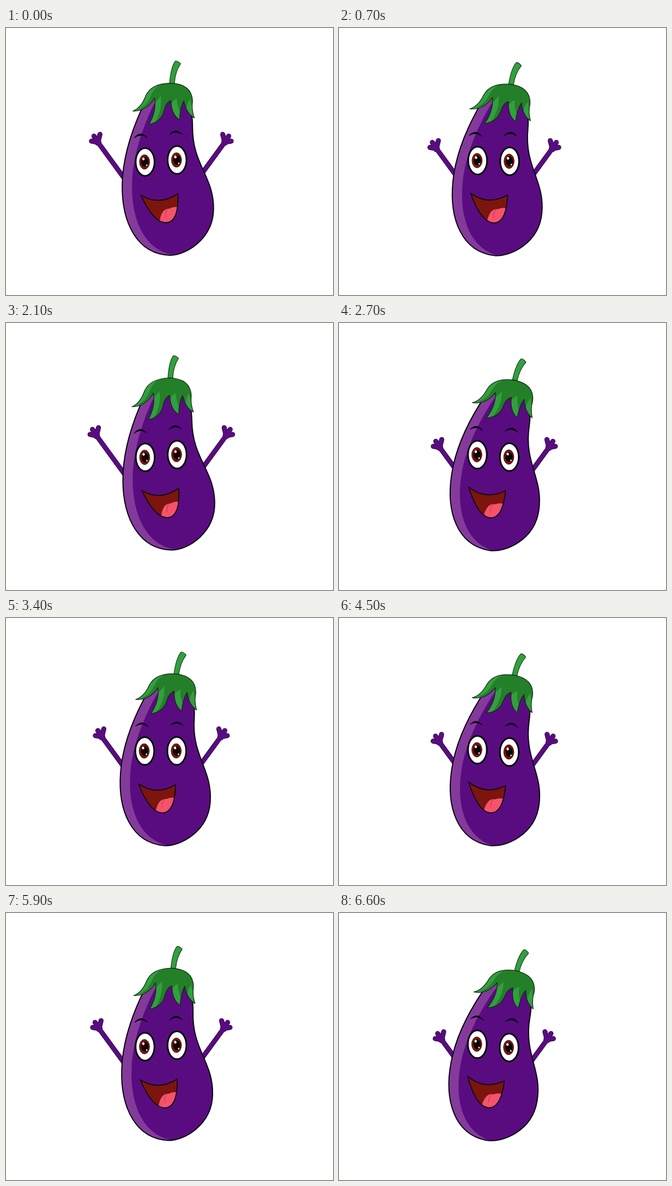
Write an HTML page with a canvas that moves like this. It is 600 px wide and 491 px high and loops after 6700 ms.

```html
<!DOCTYPE html>
<html lang="en">
<head>
<meta charset="utf-8">
<title>Waving eggplant</title>
<style>
html, body { margin: 0; width: 100%; height: 100%; overflow: hidden; background: #fff; }
canvas { display: block; width: 600px; height: 491px; }
</style>
</head>
<body>
<canvas id="stage" width="600" height="491"></canvas>
<script>
const ctx = document.getElementById('stage').getContext('2d');
const LOOP = 6700, STEP = 100, SWING = 1810, FIRST_LEFT = 200;
const MIDDLE = 285, PIVOT = 235, TILT = 0.19;
const PURPLE = '#590c80', LILAC = '#843a9b', INK = '#08030c';
const GREEN = '#247f29', LIME = '#339e40';

const body = new Path2D(`M246,152 C230,190 214,240 214.5,290 C215,360 245,417 305,417.5
  C335,417 384,385 383,330 C382,270 342,250 341,180 Q339,112 300,112 Q262,112 246,152Z`);
const leaf = new Path2D(`M231,154 Q256,154 270,129 Q275,152 261,178 Q284,172 288,152 Q291,137 300,133
  Q302,160 317,168 Q317,146 324,133 Q329,156 344,164 Q338,148 340,133 Q338,102 300,101
  Q264,102 254,125 Q246,148 231,154Z`);
const stem = new Path2D('M297,101 Q299,70 307,60 Q312,60 316.5,65 Q307,80 306,101Z');
const mouth = new Path2D('M249,308 Q283,328 317,304 Q320,357 296,358 Q273,358 249,308Z');
const tongue = new Path2D('M284,366 Q285,331 302,332 Q312,326 320,330 V366Z');
const crease = new Path2D('M298,333 Q294,341 296,348');
const brow = new Path2D('M-12,5 Q-1,-9 11,4 Q-1,-4 -12,5Z');

function paint(path, fill, line, width) {
  if (fill) { ctx.fillStyle = fill; ctx.fill(path); }
  if (line) { ctx.strokeStyle = line; ctx.lineWidth = width; ctx.stroke(path); }
}

function inside(path, draw) {
  ctx.save();
  ctx.clip(path);
  draw();
  ctx.restore();
}

function placed(x, y, angle, draw) {
  ctx.save();
  ctx.translate(x, y);
  ctx.rotate(angle);
  draw();
  ctx.restore();
}

// The lit edge is what a shifted copy of the shape leaves uncovered.
function shaded(path, dark, light, dx, dy, line, width) {
  inside(path, () => {
    paint(path, light);
    ctx.translate(dx, dy);
    paint(path, dark);
  });
  paint(path, null, line, width);
}

function oval(x, y, rx, ry, fill, line, width) {
  const path = new Path2D();
  path.ellipse(x, y, rx, ry, 0, 0, Math.PI * 2);
  paint(path, fill, line, width);
}

function eye() {
  oval(0, 0, 17.3, 25.6, '#fff', INK, 3);
  oval(-1, 0, 9.4, 13.4, '#7c1710', '#2a0503', 0.8);
  oval(-0.5, 0, 6.6, 9.2, '#0a0203');
  oval(-3, -5.5, 2.2, 2.6, '#fff');
  oval(3, 6, 1.2, 1.5, '#fff');
}

function line(x1, y1, x2, y2, color, width) {
  ctx.strokeStyle = color;
  ctx.lineWidth = width;
  ctx.beginPath();
  ctx.moveTo(x1, y1);
  ctx.lineTo(x2, y2);
  ctx.stroke();
}

// Side is 1 for the left arm, -1 for its mirror image.
function arm(side, reach) {
  ctx.save();
  ctx.translate(MIDDLE, 0);
  ctx.scale(side, 1);
  ctx.translate(-119 + 25 * reach, 207 + 29 * reach);
  for (const [color, grow] of [['#1d0330', 1.4], [PURPLE, 0]]) {
    line(0, 0, 59, 81, color, 7.6 + grow);
    for (let i = 0; i < 3; i++) {
      const a = (190 + 47 * i) * Math.PI / 180, size = 12 + 1.5 * i;
      line(0, 0, size * Math.cos(a), size * Math.sin(a), color, 7.8 + grow);
    }
    oval(0, 0, 5.6 + grow / 2, 5.6 + grow / 2, color);
  }
  ctx.restore();
}

function eggplant(angle) {
  ctx.save();
  ctx.translate(MIDDLE, PIVOT);
  ctx.rotate(angle);
  ctx.translate(-MIDDLE, -PIVOT);

  shaded(body, PURPLE, LILAC, 18, 0, INK, 2);
  paint(stem, LIME, '#10380f', 1.1);
  shaded(leaf, GREEN, LIME, 11, -4, '#0c260c', 1.2);

  for (const [x, y] of [[247, 198], [311, 191]]) {
    placed(x, y, 0, () => paint(brow, INK, INK, 1));
  }
  // Eyes stay upright while the head tilts.
  placed(255.5, 247, -angle, eye);
  placed(314, 242, -angle, eye);

  paint(mouth, '#7b150d');
  inside(mouth, () => {
    paint(tongue, '#f4536a');
    paint(crease, null, '#cf3850', 1.2);
  });
  paint(mouth, null, INK, 1.7);
  ctx.restore();
}

// From 0 (left lean, arms out) to 1 (right lean) and back, half linear, half eased.
function swing(t) {
  const phase = Math.abs(t - FIRST_LEFT) / SWING % 1;
  const p = 1 - Math.abs(1 - 2 * phase);
  return (p + (1 - Math.cos(Math.PI * p)) / 2) / 2;
}

function draw(t) {
  const s = swing(t) - 0.06;
  ctx.fillStyle = '#fff';
  ctx.fillRect(0, 0, 600, 491);
  ctx.lineJoin = ctx.lineCap = 'round';
  arm(1, s);
  arm(-1, s);
  eggplant(TILT * s / 0.9);
}

const origin = performance.now();
function frame() {
  const t = (performance.now() - origin) % LOOP;
  draw(Math.floor(t / STEP) * STEP);
  requestAnimationFrame(frame);
}
frame();
</script>
</body>
</html>
```
